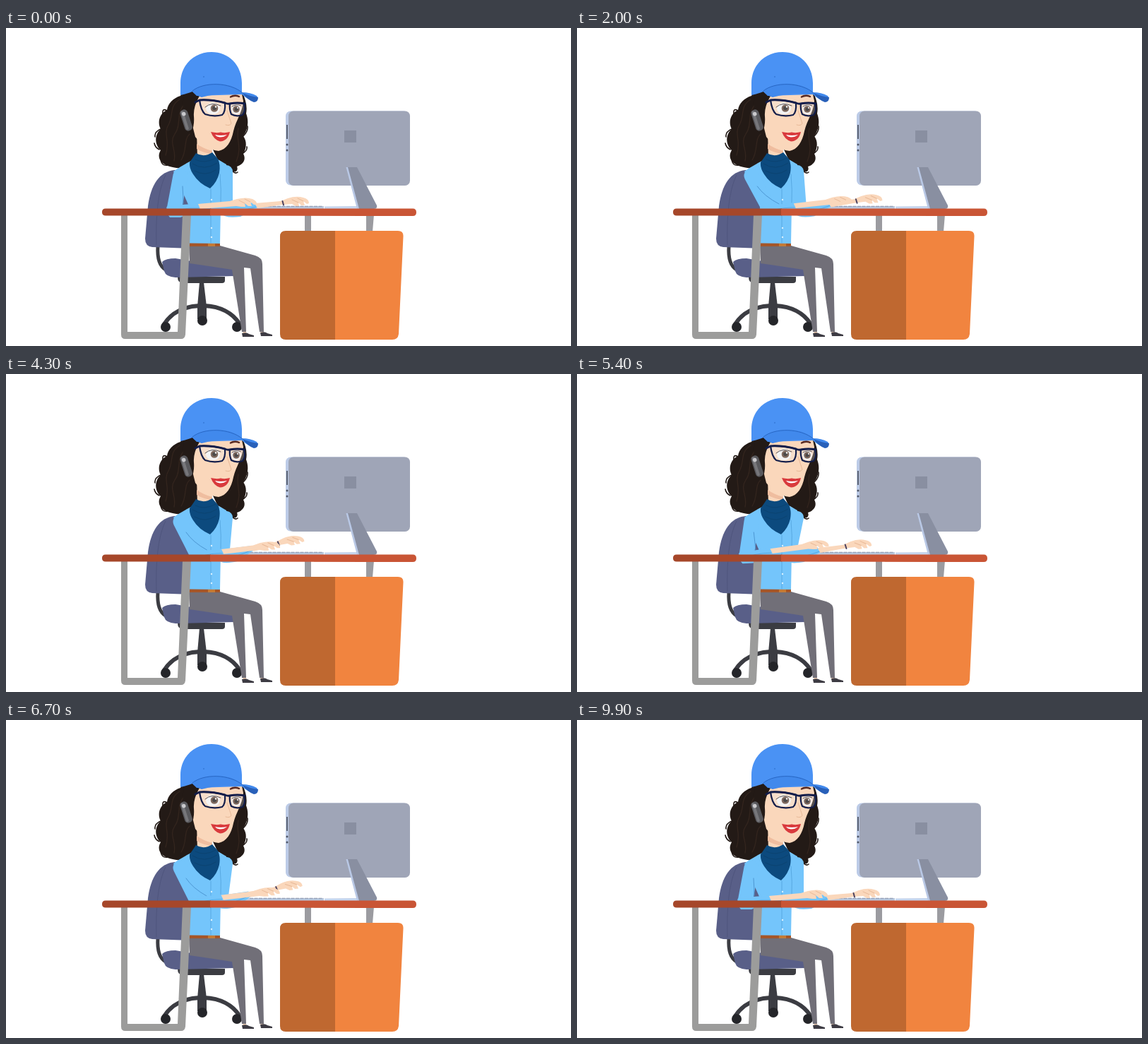
Recreate the animation shown at these times as an HTML page. Size 800 by 450 pixels, loop 10 s.

```html
<!DOCTYPE html>
<html lang="en">
<head>
<meta charset="utf-8">
<title>Woman typing at a desk</title>
<style>
  html, body { margin: 0; width: 100%; height: 100%; overflow: hidden; background: #fff; }
  svg { display: block; width: 100vw; height: 100vh; }
  .skin { fill: #fad7bb; }
  .shirt { fill: #74c5fb; }
  .sleeve { stroke: #74c5fb; }
  .hair { fill: #231a16; }
  .dark { fill: #3b3c42; }
  .metal { fill: #9c9c9b; }
  .line { fill: none; stroke-linecap: round; stroke-linejoin: round; }
  .fold { stroke: #58a9e2; stroke-width: 1; }
  .curl { stroke: #33251e; stroke-width: 1.3; }
  .wisp { stroke: #231a16; stroke-width: 1.6; }
  .crease { stroke: #e8b998; stroke-width: 1; }
</style>
</head>
<body>
<svg viewBox="0 0 800 450">
  <!-- chair -->
  <g>
    <path class="line" d="M215 309C214 325 217 337 226 342" stroke="#3b3c42" stroke-width="5"/>
    <path d="M239 201C217 203 205 222 201 252L197 298Q197 309 207 310L262 312V204Z" fill="#595f88"/>
    <path class="line" d="M226 208C214 232 212 272 213 307" stroke="#4f557d" stroke-width="1"/>
    <path class="dark" d="M243 352H310V357Q310 361 306 361H249Q243 360 243 352Z"/>
    <path class="dark" d="M274 360H280L284 394V412H271V394Z"/>
    <path class="line" d="M274 393C252 394 234 403 224 419M281 393C303 394 321 403 331 419" stroke="#3b3c42" stroke-width="6"/>
    <g fill="#242529"><circle cx="226" cy="423" r="7"/><circle cx="278" cy="414" r="7"/><circle cx="327" cy="423" r="7"/></g>
    <path d="M221 331Q226 326 240 326L322 340V351L240 353Q226 352 224 344Z" fill="#595f88"/>
  </g>

  <!-- legs -->
  <path class="skin" d="M335 428H340V434H336ZM360 428H365V434H361Z"/>
  <path d="M259 308H303L353 322Q363 325 363 334L365 430H359L346 340L337 339L340 430H334L320 342Q288 337 260 333Z" fill="#716f78"/>
  <path d="M334 432Q341 430 344 433L351 435V437H335ZM360 431Q367 429 370 432L377 434V436H361Z" fill="#3d3b43"/>

  <!-- hair behind -->
  <path class="hair" d="M254 84L247 96C237 99 229 107 228 116C217 121 214 134 219 143C210 151 210 165 219 173C212 185 221 194 236 197C249 201 262 194 271 184L292 170L300 187C307 188 312 198 321 203C326 205 329 201 327 196C337 193 340 185 336 178C341 169 341 160 336 153C343 143 344 131 340 121C342 110 339 101 335 92Z"/>
  <path class="line wisp" d="M228 117Q221 113 222 121M219 143Q210 147 211 154M217 172Q211 169 210 163M219 185Q220 196 229 194M336 153Q343 146 342 139M334 178Q342 174 341 168M320 202Q325 207 328 204"/>
  <path class="line curl" d="M246 101C230 111 238 123 230 137C222 150 233 160 226 180M253 108C240 120 249 137 239 150C230 163 242 172 238 188M260 150C251 158 257 173 248 187M329 142C325 158 335 168 326 189"/>

  <!-- torso -->
  <path class="shirt" d="M237 203Q248 195 264 187L300 186Q307 190 312 193V252H304L303 305H260L259 252Z"/>
  <path class="line sleeve" id="farUpper" stroke-width="18"/>
  <path class="line fold" d="M303 207Q305 228 304 250M290 228V304"/>
  <g fill="#d9f0ff"><circle cx="291" cy="243" r="1.2"/><circle cx="291" cy="263" r="1.2"/><circle cx="291" cy="283" r="1.2"/><circle cx="291" cy="296" r="1.2"/></g>
  <path d="M259 304.500L303 305V309H259Z" fill="#a45629"/>
  <path d="M286 305H296V309H286Z" fill="#c37b36"/>

  <!-- neck and scarf -->
  <path class="skin" d="M270 145H292V186H271Z"/>
  <path d="M270 164Q280 171 292 174V178Q279 177 270 171Z" fill="#efbd9f"/>
  <path d="M269 177Q280 184 292 176L300 185Q304 193 302 205Q299 218 289 227Q273 220 265 207Q259 198 260 190Q263 186 269 177Z" fill="#0c4a7e"/>
  <path class="line" d="M268 186Q281 193 297 184M264 192Q281 203 299 191M267 202Q282 211 297 201" stroke="#0b4371" stroke-width="1"/>

  <!-- face -->
  <path class="skin" d="M264 89H333L336 103C335 120 326 129 322 146C319 161 312 172 301 174C289 173 276 165 268 154L262 130Z"/>
  <path class="hair" d="M252 84H277Q279 91 273 98Q265 112 266 125Q267 137 263 147L249 142Z"/>
  <path class="line" d="M318 97.500Q324 94 330 97" stroke="#5a2a22" stroke-width="2.500"/>
  <ellipse cx="293" cy="114" rx="10" ry="8" fill="#f6f3f1"/>
  <ellipse cx="326" cy="115" rx="6.500" ry="7" fill="#f6f3f1"/>
  <g fill="#5b3b29"><circle cx="295" cy="113.500" r="5.300"/><circle cx="326" cy="115" r="4.800"/></g>
  <g fill="#17110f"><circle cx="295" cy="113.500" r="2.800"/><circle cx="326" cy="115" r="2.500"/></g>
  <g fill="#fff"><circle cx="297" cy="111.500" r="1.200"/><circle cx="328" cy="113" r="1.100"/></g>
  <path class="line" d="M282 112Q291 104 304 110M320 111Q326 107 333 110" stroke="#2a1a17" stroke-width="1"/>
  <path class="line crease" d="M313 117Q317 129 319 135Q317 139 311 137"/>
  <g class="line" stroke="#121d4a" stroke-width="2.200">
    <path d="M274 102Q292 101 310 106Q311 119 306 123Q294 126 282 122Q276 117 274 102Z" fill="#e7f1fa" fill-opacity=".25"/>
    <path d="M317 107Q328 105 337 107Q340 117 335 123Q326 126 319 122Q316 115 317 107Z" fill="#e7f1fa" fill-opacity=".25"/>
    <path d="M268 105L274 102Q292 101 310 106Q314 108 317 107Q328 105 338 107" stroke-width="3"/>
  </g>
  <path d="M290 147Q298 149 304 147.500Q310 149 317 147Q314 160 303 160.500Q294 158 290 147Z" fill="#d93a3d"/>
  <path d="M296 151Q304 153 313 151Q309 154.500 303 154.500Q298 154 296 151Z" fill="#fff"/>

  <!-- headset -->
  <g transform="rotate(-18 255 130)">
    <rect x="249.500" y="115" width="11" height="31" rx="5" fill="#59595d"/>
    <rect x="251" y="116" width="4" height="28" rx="2" fill="#77777b"/>
    <circle cx="254.500" cy="121" r="2.800" fill="#c9c9cc"/>
  </g>

  <!-- cap -->
  <path d="M247 95V78C247 52 267 34 291 34C315 34 334 52 334 78V94L270 96L264 90Q256 93 247 95Z" fill="#4a92f4"/>
  <path d="M264 90C279 75 317 75 334 91Q346 91 355 96Q358 99 354 104Q344 103 334 94Q304 91 277 98Q268 95 264 90Z" fill="#4189ec"/>
  <path d="M335 92Q346 97 357 98Q357 105 351 105Q342 102 335 92Z" fill="#2860b9"/>
  <path class="line" d="M264 89C279 76 317 76 335 92" stroke="#2867c5" stroke-width="1"/>
  <circle cx="280" cy="69" r=".8" fill="#2867c5"/>

  <!-- monitor and keyboard -->
  <rect x="396" y="117.500" width="174" height="105" rx="7" fill="#bccbe7"/>
  <rect x="400" y="117.500" width="172" height="105.500" rx="7" fill="#9fa5b7"/>
  <path d="M398 137V157" stroke="#515767" stroke-width="1.800"/>
  <g fill="#515767"><circle cx="398" cy="165" r="1.500"/><circle cx="398" cy="173" r="1.500"/></g>
  <rect x="479" y="145" width="17" height="17" fill="#898fa1"/>
  <path d="M451 255V252.500L492 252H515V256H451Z" fill="#c6d5ed"/>
  <path d="M482 197H497L525 251Q526 256 521 256H498Z" fill="#898fa1"/>
  <path d="M481.500 197H484L500 256H497Z" fill="#b9c8e5"/>
  <path d="M334 256L343 252H450V256Z" fill="#bac9df"/>
  <path d="M345 252.500H449" stroke="#97a4bb" stroke-width="1.500" stroke-dasharray="5 1.500"/>

  <!-- far arm -->
  <g id="far">
    <path class="shirt" d="M305 252Q308 248 323 248L352 247L356 254L332 267Q309 270 305 262Z"/>
    <path class="line fold" d="M313 262Q333 260 354 253"/>
    <path class="skin" d="M352 248L389 245L399 241Q411 237 421 240Q429 242 429 248L426 249L421 245L423 251H418L414 247L415 252H410L405 249L392 250L356 255Z"/>
    <path class="line crease" d="M413 241L421 245M405 243L414 247"/>
    <path class="line" d="M391.500 245L393 250.500" stroke="#4b4260" stroke-width="2"/>
  </g>

  <!-- near arm -->
  <path id="nearUpper" class="line sleeve" stroke-width="21"/>
  <path id="seam" class="line" stroke="#4d97d3" stroke-width="1"/>
  <g id="near">
    <path class="shirt" d="M227.500 253Q236 247 250 250L273 248L276 257L247 268H232Q227 263 227.500 253Z"/>
    <path class="line fold" d="M247 257Q260 254 273 255"/>
    <path class="skin" d="M272 249L317 245L327 242Q340 239 349 242Q356 245 355 250L351 250L346 246L348 252H343L338 248L339 253H333L326 252L275 256Z"/>
    <path class="line crease" d="M338 242L346 246M330 244L338 248"/>
  </g>

  <!-- desk -->
  <path d="M423 264H432V288H423ZM510 264H521L519 288H510Z" fill="#9b9ba0"/>
  <path class="metal" d="M163 264H172V430H243L250 264H262L254 434Q253 440 248 440H169Q163 440 163 434Z"/>
  <path d="M141 255.500H290V265.500H141Q136 265.500 136 260.500Q136 255.500 141 255.500Z" fill="#a6472a"/>
  <path d="M289 255.500H576Q581 255.500 581 261Q581 266 576 266L289 265.500Z" fill="#c95535"/>
  <path d="M466 287H396Q388 287 388 295V433Q388 441 396 441H466Z" fill="#bf6830"/>
  <path d="M466 287H555Q563 287 562.500 295L556 433Q555 441 547 441H466Z" fill="#f1843f"/>
</svg>
<script>
  const LOOP = 10000, STEP = 100, CYCLE = 2475;
  // time, near shift, near angle, far shift, far angle
  const poses = [
    [0, 0, 0, 0, 0],
    [450, 2, -3, -11, -2.5],
    [725, 9, -0.5, 5, -2],
    [875, 7, 0, 4, -0.5],
    [1750, 33, -2, -7, -6.5],
    [2000, 35, -1.5, 4, -2],
    [CYCLE, 0, 0, 0, 0]
  ];
  const part = id => document.getElementById(id);
  const near = part('near'), nearUpper = part('nearUpper'), seam = part('seam');
  const far = part('far'), farUpper = part('farUpper');

  function poseAt(time) {
    const i = poses.findIndex(p => p[0] > time);
    const a = poses[i - 1], b = poses[i];
    const k = (1 - Math.cos(Math.PI * (time - a[0]) / (b[0] - a[0]))) / 2;
    return a.slice(1).map((v, n) => v + (b[n + 1] - v) * k);
  }

  function draw(time) {
    const [nx, na, fx, fa] = poseAt(time % CYCLE);
    near.setAttribute('transform', `translate(${nx} 0) rotate(${na} 239 259)`);
    far.setAttribute('transform', `translate(${fx} 0) rotate(${fa} 312 261)`);
    const elbow = 238 + nx;
    nearUpper.setAttribute('d', `M247 209L${elbow} 257`);
    seam.setAttribute('d', `M${250 + nx * 0.15} 224Q${251 + nx * 0.4} 238 ${elbow + 13} 249`);
    farUpper.setAttribute('d', `M312 203L${312 + fx} 256`);
  }

  const start = performance.now();
  function tick() {
    const time = (performance.now() - start) % LOOP;
    draw(Math.floor(time / STEP) * STEP);
    requestAnimationFrame(tick);
  }
  tick();
</script>
</body>
</html>
```
